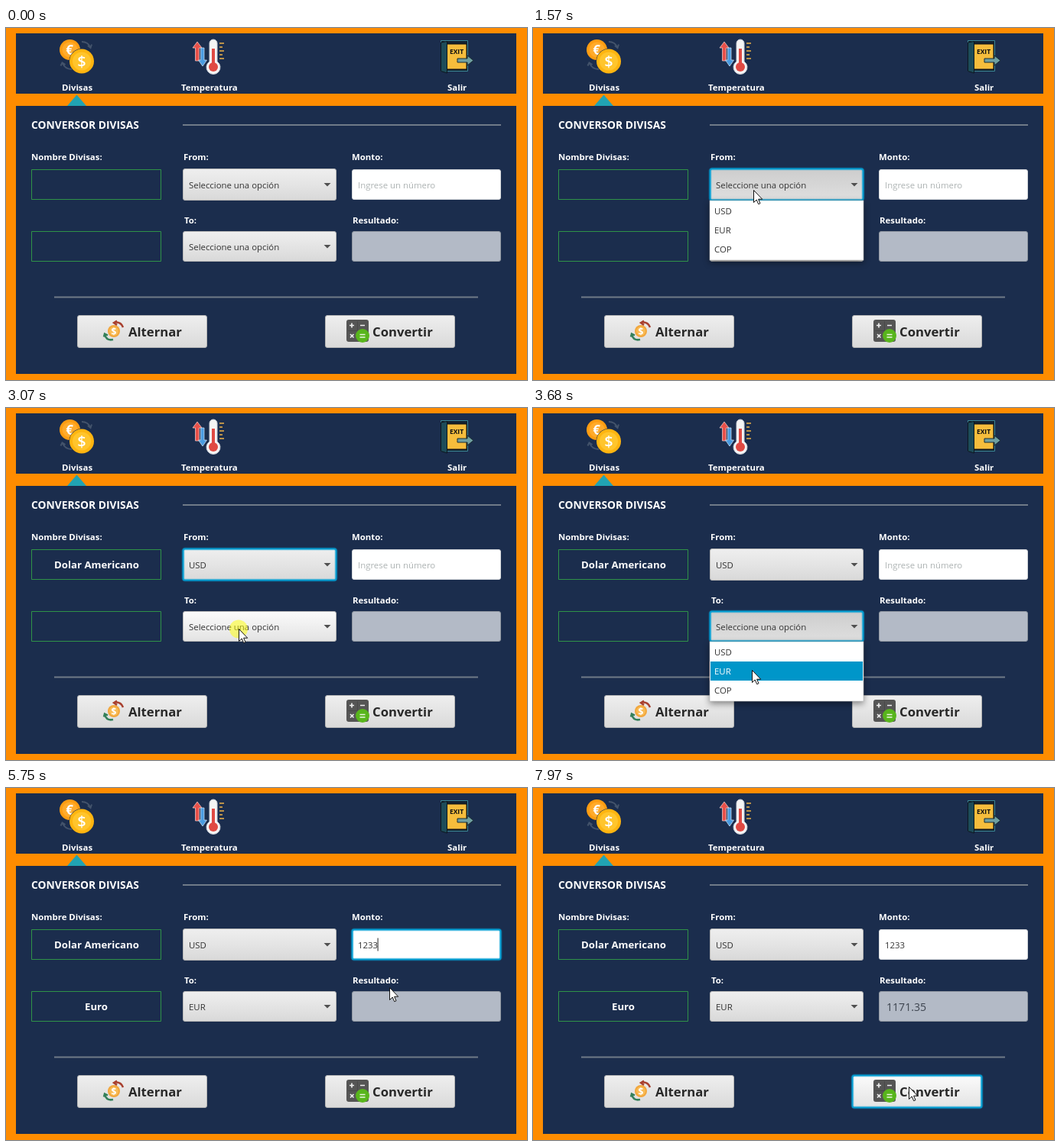
Recreate the animation shown at these times as an HTML page. Size 681x461 px, loop 8 s.

```html
<!DOCTYPE html>
<html lang="es">
<head>
<meta charset="utf-8">
<title>Conversor</title>
<style>
  html, body { margin: 0; width: 100%; height: 100%; overflow: hidden; background: #ff8c00; }
  svg { display: block; width: 100%; height: 100%; cursor: default; }
  text { font: 11.4px "Open Sans", "Noto Sans", sans-serif; fill: #333; }
  .label text { font-weight: 700; fill: #fff; }
  text.title { font-size: 13.8px; }
  text.name { font-size: 13.2px; text-anchor: middle; }
  text.action { font-size: 16.7px; font-weight: 700; fill: #282828; }
  text.mid { text-anchor: middle; font-weight: 700; }
  .box { fill: url(#idle); stroke: #b5b5b5; }
  .hover .box { fill: url(#hover); }
  .open .box { fill: url(#armed); }
  .ring { fill: none; stroke: #039ed3; stroke-width: 2; visibility: hidden; }
  .focus .ring { visibility: visible; }
  .glow { stroke-opacity: .3; stroke-width: 4; }
  .popup { filter: drop-shadow(0 3px 4px rgba(0, 0, 0, .45)); }
  .row rect { fill: #fff; }
  .row.hover rect { fill: #0096c9; }
  .row.hover text { fill: #fff; }
  .row.picked rect { stroke: #4fb8de; }
</style>
</head>
<body>
<svg viewBox="0 0 681 461" preserveAspectRatio="none">
  <defs>
    <linearGradient id="idle" x2="0" y2="1"><stop stop-color="#efefef"/><stop offset="1" stop-color="#d9d9d9"/></linearGradient>
    <linearGradient id="hover" x2="0" y2="1"><stop stop-color="#fbfbfb"/><stop offset="1" stop-color="#e3e3e3"/></linearGradient>
    <linearGradient id="armed" x2="0" y2="1"><stop stop-color="#cdcdcd"/><stop offset="1" stop-color="#dfdfdf"/></linearGradient>
  </defs>

  <rect width="681" height="461" fill="#ff8c00"/>
  <path d="M13 7H667V86H13ZM13 102H667V453H13Z" fill="#1b2d4d"/>
  <path d="M80 102L92.500 87.500L105 102Z" fill="#21a3b3"/>
  <path d="M231 127H647M63 352.500H617" stroke="#707a88" stroke-width="2"/>
  <path d="M33.500 185.500h169v39h-169zM33.500 266.500h169v39h-169z" fill="none" stroke="#2f9348"/>

  <!-- coins -->
  <g>
    <path d="M99 18Q107 18 110 25M107 23l3.500 3 1.500-4.500M86 54Q77 54 74 46M71.500 49.500l2-4 4 2.500" fill="none" stroke="#43536b" stroke-width="2"/>
    <circle cx="83.500" cy="28.500" r="13.500" fill="#ff9d12"/>
    <circle cx="83.500" cy="28.500" r="10" fill="#ffab2b"/>
    <text class="mid" x="83" y="34.500" style="font-size:17px;fill:#fff">€</text>
    <circle cx="99" cy="43.500" r="16.500" fill="#1b2d4d"/>
    <circle cx="99" cy="43.500" r="16" fill="#ffb510"/>
    <circle cx="99" cy="43.500" r="12" fill="#ffc52c"/>
    <text class="mid" x="99" y="50.500" style="font-size:20px;fill:#fff;font-weight:600">$</text>
  </g>

  <!-- thermometer -->
  <g>
    <path d="M250 18l6 8h-3.500v17h-5v-17H244Z" fill="#e8514a" stroke="#f5d8d6" stroke-width=".7"/>
    <path d="M257 50l-5.500-8h3V26h4.500v16h3.500Z" fill="#4a9be0" stroke="#d8e9f7" stroke-width=".7"/>
    <path d="M266 44V20a5 5 0 0 1 10 0V44a9 9 0 1 1-10 0Z" fill="#f4f4f4" stroke="#c9cfd8"/>
    <path d="M271 27V50" stroke="#e04a43" stroke-width="4"/>
    <circle cx="271" cy="51" r="6" fill="#e04a43"/>
    <path d="M279 20h6M279 25h4M279 30h6M279 35h4M279 40h6" stroke="#efb347" stroke-width="1.500"/>
  </g>

  <!-- exit door -->
  <g>
    <path d="M568.500 16.500H603.500V56.500H568.500Z" fill="#14222f" stroke="#3b8796"/>
    <path d="M571 19v35M574 17v39" stroke="#2b6f80"/>
    <path d="M576 21H602V54H576Z" fill="#f6bd3c" stroke="#111"/>
    <path d="M568.500 19l8-1.500V59l-8-2.500Z" fill="#1d4c59" stroke="#0d161e"/>
    <path d="M590 40H603V36L611 42.500L603 49V45H590Z" fill="#6f9fa0" stroke="#1a2c33"/>
    <text class="mid" x="589" y="34" style="font-size:8.500px;fill:#111">EXIT</text>
  </g>

  <g class="label">
    <text x="73" y="82">Divisas</text>
    <text x="229" y="82">Temperatura</text>
    <text x="577" y="82">Salir</text>
    <text x="33" y="132" class="title">CONVERSOR DIVISAS</text>
    <text x="33" y="173">Nombre Divisas:</text>
    <text x="232" y="173">From:</text>
    <text x="452" y="173">Monto:</text>
    <text x="233" y="256">To:</text>
    <text x="453" y="256">Resultado:</text>
    <text x="118.500" y="210" class="name" id="fromName"></text>
    <text x="118" y="291" class="name" id="toName"></text>
  </g>

  <g id="controls"></g>

  <!-- swap icon -->
  <g>
    <circle cx="141" cy="397" r="8" fill="#f2a63b"/>
    <circle cx="141" cy="397" r="6" fill="#f8bb55"/>
    <text class="mid" x="141" y="401.500" style="font-size:12px;fill:#fff">$</text>
    <path d="M141 386Q150 384 153 392M145 383.500l-4 2.500 4 3" fill="none" stroke="#a8402f" stroke-width="2.500"/>
    <path d="M129 401Q131 410 140 408M128 404.500l1-4 4 2" fill="none" stroke="#34805a" stroke-width="2.500"/>
  </g>
  <!-- calculator icon -->
  <g>
    <rect x="445" y="382" width="29" height="29" rx="3" fill="#555"/>
    <path d="M449 389.500h6M452 386.500v6M463 389.500h6M450 401l4.500 4.500M454.500 401l-4.500 4.500" stroke="#eee" stroke-width="1.700"/>
    <path d="M459.500 384v25M447 396.500h25" stroke="#484848"/>
    <circle cx="466" cy="403" r="9" fill="#58b51c"/>
    <path d="M462.500 401.500h7M462.500 405h7" stroke="#e9f7df" stroke-width="1.500"/>
  </g>
  <text x="160" y="404" class="action">Alternar</text>
  <text x="479" y="404" class="action">Convertir</text>

  <g id="popups"></g>
  <circle id="press" r="12" fill="#ff0" fill-opacity=".5"/>
  <g id="pointer">
    <path id="arrow" d="M.5.5V16.500L4.200 13 6.700 18.700 9 17.700 6.600 12.200H11.700Z" fill="#fff" stroke="#111"/>
    <path id="beam" d="M-3-8.500h2.500l.5.500.5-.5H3M0-8V8M-3 8.500h2.500l.5-.5.500.5H3" fill="none" stroke="#111"/>
  </g>
</svg>

<script>
const LOOP = 8000, STEP = 70;
const $ = id => document.getElementById(id);
const between = (t, a, b) => t >= a && t < b;
const PROMPT = 'Seleccione una opción';

const areas = {
  from: [231, 184, 201, 42], to: [231, 266, 201, 40],
  swap: [93, 376, 170, 43], convert: [417, 376, 170, 43],
  amount: [452, 185, 195, 40]
};
const popups = { from: 227, to: 307 };

const frame = ([x, y, w, h], extra = '') => {
  const size = `x="${x + .5}" y="${y + .5}" width="${w - 1}" height="${h - 1}" rx="2.500"`;
  return `<rect class="box" ${size} ${extra}/><rect class="ring glow" ${size}/><rect class="ring" ${size}/>`;
};
const combo = (id, base) => `<g id="${id}">${frame(areas[id])}
  <text id="${id}Text" x="239" y="${base}"></text>
  <path d="M415.500 ${base - 7}h9l-4.500 4.500Z" fill="#505050"/></g>`;

$('controls').innerHTML = combo('from', 210) + combo('to', 291) +
  `<g id="swap">${frame(areas.swap)}</g><g id="convert">${frame(areas.convert)}</g>
  <g id="amount">${frame(areas.amount, 'style="fill:#fff;stroke:#d3d6da"')}
    <text id="amountText" x="460" y="210"></text>
    <path id="caret" d="M0 196.500V213.500" stroke="#222"/></g>
  <rect x="452.500" y="266.500" width="194" height="39" rx="2.500" fill="#b3bac6" stroke="#8e959f"/>
  <text id="result" x="462" y="291.500" style="font-size:14.100px;fill:#3c434e">1171.35</text>`;

$('popups').innerHTML = Object.entries(popups).map(([id, y]) => `<g id="${id}Popup" class="popup">
  <rect x="231" y="${y - 1}" width="201" height="78" fill="#fff" stroke="#b8b8b8" stroke-width=".6"/>
  ${['USD', 'EUR', 'COP'].map((code, i) => `<g class="row">
    <rect x="232" y="${y + 25 * i}" width="199" height="25"/>
    <text x="237" y="${y + 25 * i + 17}">${code}</text></g>`).join('')}</g>`).join('');

// time, x, y of the pointer tip
const path = [
  [390, 330, 411], [1160, 284, 206], [1430, 284, 206], [1910, 305, 234], [2380, 305, 234],
  [3000, 304, 289], [3140, 304, 289], [3680, 286, 343], [4340, 286, 343], [4870, 506, 205],
  [5080, 506, 205], [5150, 500, 256], [5680, 500, 256], [5750, 501, 261], [6030, 497, 394],
  [6230, 497, 394], [6370, 497, 391], [7900, 497, 391], [7970, 491, 391], [LOOP, 491, 391]
];
const clicks = [1430, 2310, 3070, 4270, 4870, 6700];
const typing = [[5080, '1'], [5550, '12'], [5610, '123'], [5750, '1233']];

const ease = p => p * p * (3 - 2 * p);

function pointerAt(t) {
  const i = path.findIndex(k => t < k[0]);
  if (i < 1) return [-50, -50];
  const [a, b] = [path[i - 1], path[i]];
  const passed = Math.floor((t - a[0]) / STEP) * STEP;
  const p = ease(passed / (b[0] - a[0]));
  return [a[1] + (b[1] - a[1]) * p, a[2] + (b[2] - a[2]) * p];
}

const inside = ([px, py], [x, y, w, h]) => px >= x && px < x + w && py >= y && py < y + h;
const show = (id, on) => { $(id).style.display = on ? '' : 'none'; };

function render(t) {
  const tip = pointerAt(t);
  const pressed = clicks.some(c => between(t, c, c + 140));
  const open = between(t, 1500, 2380) ? 'from' : between(t, 3140, 4340) ? 'to' : '';
  const focus = t < 1430 ? '' : t < 3140 ? 'from' : t < 4870 ? 'to' : t < 6700 ? 'amount' : 'convert';

  for (const id in areas) {
    const list = $(id).classList;
    list.toggle('hover', !open && inside(tip, areas[id]));
    list.toggle('focus', focus === id);
    list.toggle('open', open === id || (id === 'convert' && between(t, 6700, 6840)));
  }
  for (const id in popups) {
    show(id + 'Popup', open === id);
    $(id + 'Popup').querySelectorAll('.row').forEach((row, i) => {
      const over = inside(tip, [232, popups[id] + 25 * i, 199, 25]);
      row.classList.toggle('hover', over);
      row.classList.toggle('picked', over && pressed);
    });
  }

  const fromSet = t >= 2310, toSet = t >= 4270;
  $('fromText').textContent = fromSet ? 'USD' : PROMPT;
  $('toText').textContent = toSet ? 'EUR' : PROMPT;
  $('fromName').textContent = fromSet ? 'Dolar Americano' : '';
  $('toName').textContent = toSet ? 'Euro' : '';

  const typed = typing.reduce((text, [at, value]) => t >= at ? value : text, '');
  const prompt = t < 4870;
  $('amountText').textContent = prompt ? 'Ingrese un número' : typed;
  $('amountText').style.fill = prompt ? '#adb3b3' : '';
  $('caret').setAttribute('transform', `translate(${460 + 6.52 * typed.length})`);
  show('caret', between(t, 4870, 6230));
  show('result', t >= 6840);

  const inField = inside(tip, areas.amount);
  show('arrow', !inField);
  show('beam', inField);
  show('press', pressed);
  const [x, y] = tip.map(Math.round);
  $('pointer').setAttribute('transform', `translate(${x} ${y})`);
  $('press').setAttribute('transform', `translate(${x} ${y + .5})`);
}

function tick() {
  render(performance.now() % LOOP);
  requestAnimationFrame(tick);
}
tick();
</script>
</body>
</html>
```
